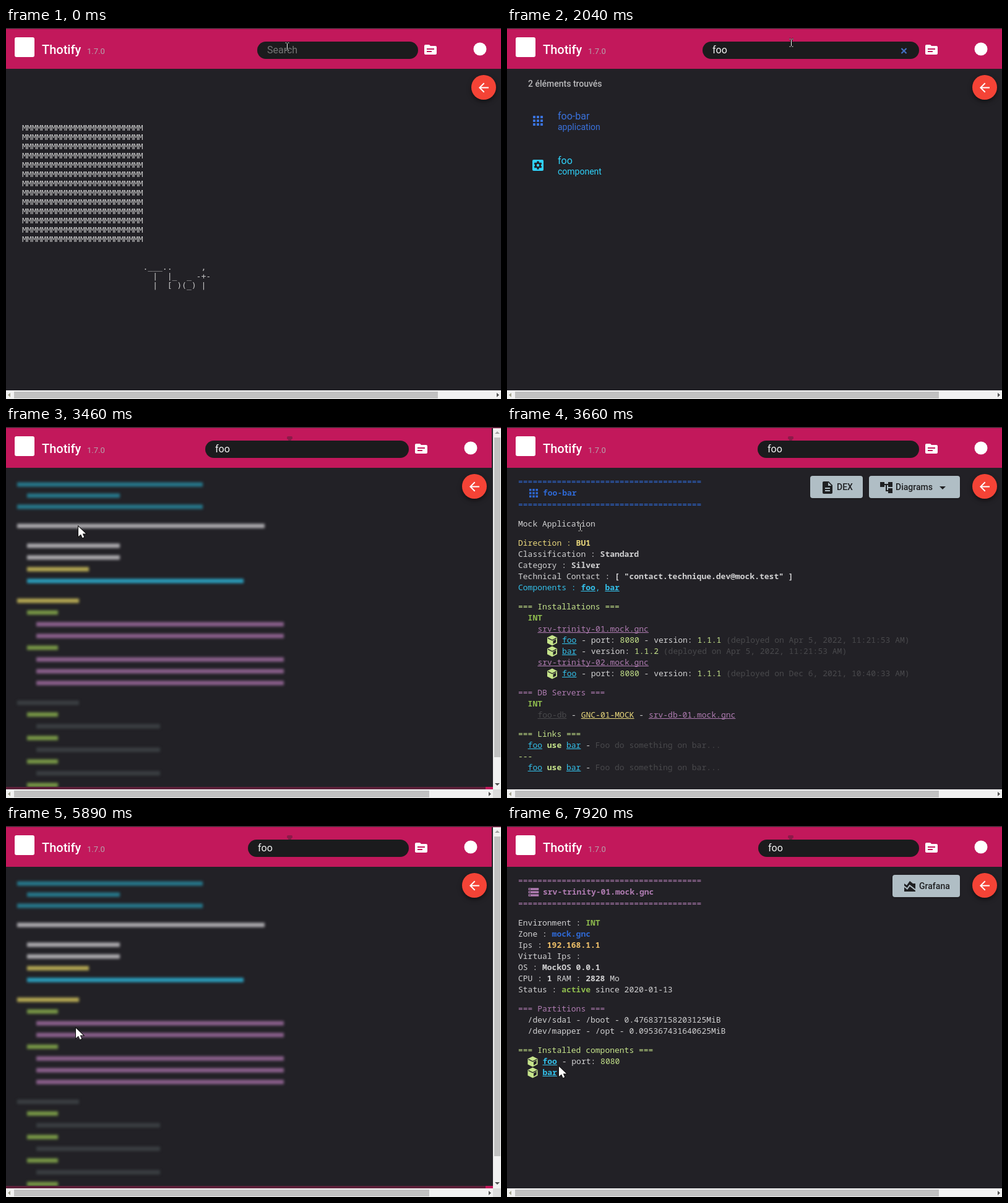
Recreate the animation shown at these times as an HTML page with a canvas. Size 800 by 600 pixels, loop 8 s.

```html
<!DOCTYPE html>
<html lang="fr">
<head>
<meta charset="utf-8">
<title>Thotify</title>
<style>
html, body { margin: 0; width: 800px; height: 600px; overflow: hidden; background: #222126; }
canvas { display: block; }
</style>
</head>
<body>
<canvas id="stage" width="800" height="600"></canvas>
<script>
const ctx = document.getElementById('stage').getContext('2d');
const LOOP = 8000, STEP = 203;
const BG = '#222126', PINK = '#c2185b';
const MONO = '"Noto Sans Mono", monospace', UI = 'Roboto, sans-serif';
const COLORS = {
  w: '#d2d2d3', b: '#2f69d4', y: '#ead87c', c: '#33c2ec', l: '#c6e48b',
  g: '#8fbc4e', p: '#b07cb2', d: '#49494c', o: '#efc069'
};
const ICONS = {
  folder: 'M20 6h-8l-2-2H4C2.9 4 2 4.9 2 6v12c0 1.1.9 2 2 2h16c1.1 0 2-.9 2-2V8c0-1.1-.9-2-2-2zM14 16H6v-2h8zM18 12H6v-2h12z',
  back: 'M20 11H7.8l5.6-5.6L12 4l-8 8 8 8 1.4-1.4L7.8 13H20z',
  doc: 'M14 2H6c-1.1 0-2 .9-2 2v16c0 1.1.9 2 2 2h12c1.1 0 2-.9 2-2V8zM16 18H8v-2h8zM16 14H8v-2h8zM13 9V3.5L18.5 9z',
  tree: 'M22 11V3h-7v3H9V3H2v8h7V8h2v10h4v3h7v-8h-7v3h-2V8h2v3z',
  chart: 'M3 13v7h18v-1.5l-9-7L8 17zM3 7l4 3 5-7 5 4h4v9l-9.4-7.3-4 5.4L3 10.4z',
  server: 'M2 20h20v-4H2zM4 17h2v2H4zM2 4v4h20V4zM6 7H4V5h2zM2 14h20v-4H2zM4 11h2v2H4z',
  apps: [4, 10, 16].map(x => [4, 10, 16].map(y => `M${x} ${y}h4v4h-4z`).join('')).join(''),
  arrow: 'M0 0V16L4 12.4 6.6 18.2 9.2 17 6.7 11.4H12z',
  hand: 'M-1 0Q1 -1 1.6 1V6Q3 5 4 6.4 5.6 5.4 6.6 7 8.6 6.4 9 8.4V12Q8.4 14 7.4 16H-1Q-3 12.6-5.4 9.6-5.2 7.4-3 8.8L-1.6 10V1Q-1.6.3-1 0Z'
};
for (const name in ICONS) ICONS[name] = new Path2D(ICONS[name]);

function rect(x, y, w, h, color, r = 0) {
  ctx.fillStyle = color;
  ctx.beginPath();
  ctx.roundRect(x, y, w, h, r);
  ctx.fill();
}
function disc(x, y, r, color) {
  ctx.fillStyle = color;
  ctx.beginPath();
  ctx.arc(x, y, r, 0, 7);
  ctx.fill();
}
function poly(points, color) {
  ctx.fillStyle = color;
  ctx.beginPath();
  points.forEach(p => ctx.lineTo(...p));
  ctx.fill();
}
function text(s, x, y, font, color) {
  ctx.font = font;
  ctx.fillStyle = color;
  ctx.fillText(s, x, y);
  return ctx.measureText(s).width;
}
function icon(name, x, y, color, size = 24) {
  ctx.save();
  ctx.translate(x, y);
  ctx.scale(size / 24, size / 24);
  ctx.fillStyle = color;
  ctx.fill(ICONS[name], 'evenodd');
  ctx.restore();
}

// "key:text" runs joined by "|"; a capital key is bold, a trailing "_" underlines.
function line(x, y, runs) {
  for (const run of runs.split('|')) {
    const cut = run.indexOf(':'), key = run.slice(0, cut), k = key[0];
    const color = COLORS[k.toLowerCase()];
    const weight = k < 'a' ? 'bold ' : '';
    const w = text(run.slice(cut + 1), x, y, weight + '13px ' + MONO, color);
    if (key[1]) rect(x, y + 1, w, 1, color);
    x += w;
  }
}
function cube(x, y) {
  const hex = [[0, -8.5], [8, -4.5], [8, 4.5], [0, 8.5], [-8, 4.5], [-8, -4.5]];
  const at = list => list.map(([a, b]) => [x + a, y + b]);
  poly(at(hex), COLORS.l);
  poly(at([[1.5, .8], [6.2, -1.8], [6.2, 3.3], [1.5, 6]]), BG);
  ctx.strokeStyle = BG;
  ctx.lineWidth = 1.2;
  ctx.beginPath();
  ctx.moveTo(x - 7, y - 3.6);
  ctx.lineTo(x, y - .2);
  ctx.lineTo(x + 7, y - 3.6);
  ctx.stroke();
}
function button(x, w, name, iconX, label, labelX) {
  ctx.save();
  ctx.shadowColor = 'rgba(0,0,0,.3)';
  ctx.shadowBlur = 3;
  ctx.shadowOffsetY = 1;
  rect(x, 79, w, 36, '#b0bec5', 4);
  ctx.restore();
  icon(name, iconX, 86, '#1f2022');
  text(label, labelX, 102, '500 14px ' + UI, '#1f2022');
}

function home() {
  const font = '13px "DejaVu Sans Mono", monospace';
  for (let row = 5; row < 18; row++) text('M'.repeat(25), 26, 91 + row * 15, font, '#c9c9c9');
  ['.___..      ,', '  |  |_  _ -+-', '  |  [ )(_) |']
    .forEach((s, i) => text(s, 221.5, 391 + i * 15, font, '#c9c9c9'));
}

function results(tick) {
  if (tick >= 13) rect(26, 114, 755, 72, '#2b2a2f', 3);
  text('2 éléments trouvés', 34, 95, '500 14px ' + UI, '#b9b9bb');
  const blue = '#3a72dc', cyan = '#2fd2fa';
  icon('apps', 38, 138, blue);
  text('foo-bar', 82, 148, '16px ' + UI, blue);
  text('application', 82, 165, '14px ' + UI, blue);
  rect(41, 213, 18, 18, cyan, 2);
  disc(50, 222, 5, BG);
  for (let i = 0; i < 6; i++) {
    ctx.save();
    ctx.translate(50, 222);
    ctx.rotate(i * Math.PI / 3);
    rect(-1.6, -6.6, 3.2, 3, BG);
    ctx.restore();
  }
  disc(50, 222, 2.2, cyan);
  text('foo', 82, 220, '16px ' + UI, cyan);
  text('component', 82, 237, '14px ' + UI, cyan);
}

function skeleton() {
  const bar = (y, x, w, color) => rect(x, y - 3.5, w, 7, color);
  const teal = '#26788b', grey = '#abaaae', yellow = '#b5a953', green = '#789846', plum = '#8c618d', dark = '#3a3f42';
  ctx.save();
  ctx.filter = 'blur(2px)';
  bar(93, 18, 300, teal);
  bar(111, 34, 150, teal);
  bar(129, 18, 300, teal);
  bar(160, 18, 400, grey);
  bar(192, 34, 150, grey);
  bar(211, 34, 150, grey);
  bar(230, 34, 100, yellow);
  bar(249, 34, 350, '#2a9dbb');
  bar(281, 18, 100, yellow);
  for (const y of [300, 357, 465, 503, 541, 579]) bar(y, 34, 50, green);
  for (const y of [319, 338, 376, 395, 414]) bar(y, 49, 400, plum);
  bar(446, 18, 100, dark);
  for (const y of [484, 522, 560]) bar(y, 49, 200, dark);
  ctx.restore();
  rect(0, 582, 775, 4, '#5c2039');
  rect(775, 582, 12, 4, PINK);
}

function heading(key, name, size, title) {
  const rule = key + ':' + '='.repeat(38), k = key.toUpperCase();
  line(18, 93, rule);
  icon(name, 43 - size / 2, 107 - size / 2, COLORS[key], size);
  line(58, 111, k + ':' + title);
  line(18, 130, rule);
}

function application() {
  heading('b', 'apps', 21, 'foo-bar');
  line(18, 161, 'w:Mock Application');
  line(18, 192, 'y:Direction : |Y:BU1');
  line(18, 210, 'w:Classification : |W:Standard');
  line(18, 228, 'w:Category : |W:Silver');
  line(18, 246, 'w:Technical Contact : |W:[ "contact.technique.dev@mock.test" ]');
  line(18, 264, 'c:Components : |C_:foo|c:, |C_:bar');
  line(18, 295, 'l:=== Installations ===');
  line(33.6, 313, 'G:INT');
  line(49.5, 331, 'p_:srv-trinity-01.mock.gnc');
  line(89, 349, 'c_:foo|w: - port: |l:8080|w: - version: |l:1.1.1|d: (deployed on Apr 5, 2022, 11:21:53 AM)');
  line(89, 367, 'c_:bar|w: - version: |l:1.1.2|d: (deployed on Apr 5, 2022, 11:21:53 AM)');
  line(49.5, 385, 'p_:srv-trinity-02.mock.gnc');
  line(89, 403, 'c_:foo|w: - port: |l:8080|w: - version: |l:1.1.1|d: (deployed on Dec 6, 2021, 10:40:33 AM)');
  for (const y of [345, 363, 399]) cube(73, y);
  line(18, 434, 'p:=== DB Servers ===');
  line(33.6, 452, 'G:INT');
  line(49.5, 470, 'd_:foo-db|w: - |y_:GNC-01-MOCK|w: - |p_:srv-db-01.mock.gnc');
  line(18, 501, 'l:=== Links ===');
  line(18, 537, 'l:---');
  for (const y of [519, 555]) line(33.6, y, 'c_:foo|L: use |c_:bar|w: - |d:Foo do something on bar...');
  button(490, 85, 'doc', 506, 'DEX', 533);
  button(585, 147, 'tree', 601, 'Diagrams', 628);
  poly([[699, 96], [709, 96], [704, 101]], '#1f2022');
}

function server() {
  heading('p', 'server', 20, 'srv-trinity-01.mock.gnc');
  line(18, 161, 'w:Environment : |G:INT');
  line(18, 179, 'w:Zone : |B:mock.gnc');
  line(18, 197, 'w:Ips : |O:192.168.1.1');
  line(18, 215, 'w:Virtual Ips :');
  line(18, 233, 'w:OS : |W:MockOS 0.0.1');
  line(18, 251, 'w:CPU : |W:1|w: RAM : |W:2828|w: Mo');
  line(18, 269, 'w:Status : |G:active|w: since 2020-01-13');
  line(18, 300, 'p:=== Partitions ===');
  line(33.6, 318, 'w:/dev/sda1 - /boot - 0.476837158203125MiB');
  line(33.6, 336, 'w:/dev/mapper - /opt - 0.095367431640625MiB');
  line(18, 367, 'l:=== Installed components ===');
  line(57.5, 385, 'C_:foo|w: - port: |l:8080');
  line(57.5, 403, 'C_:bar');
  cube(41.5, 381);
  cube(41.5, 399);
  button(623, 109, 'chart', 639, 'Grafana', 666);
}

function searchLeft(tick) {
  if (tick >= 4 && tick <= 16) return 316;
  return { 2: 380, 3: 325, 17: 337, 18: 405 }[tick] || 406;
}

function header(tick, shift) {
  rect(0, 0, 800, 1, '#2f3134');
  rect(0, 1, 800, 1, '#8a1c48');
  rect(0, 2, 800 - shift, 64, PINK);
  rect(14, 15, 32, 32, '#fff', 3);
  text('Thotify', 58, 42, '500 20px ' + UI, '#fff');
  text('1.7.0', 131, 42, '13px ' + UI, '#b5a5ac');

  const left = searchLeft(tick) - shift;
  rect(left, 22, 666 - shift - left, 28, '#1b1b1d', 14);
  const typed = 'foo'.slice(0, Math.max(0, tick - 4));
  const w = text(typed || 'Search', left + 16, 41, '16px ' + UI, typed ? '#f2f2f2' : '#757575');
  if (tick >= 4 && tick <= 6) rect(left + 16 + (typed ? w : 0), 27, 1, 17, '#fff');
  if (typed && tick <= 16) {
    ctx.strokeStyle = '#4470c2';
    ctx.lineWidth = 2.2;
    ctx.beginPath();
    for (const d of [-4, 4]) {
      ctx.moveTo(641.5 - d, 33);
      ctx.lineTo(641.5 + d, 41);
    }
    ctx.stroke();
  }
  if (tick >= 11) {
    rect(454, 15, 9, 5, '#8b1b49', 2);
    rect(456, 19, 5, 3, '#8b1b49', 1);
  }
  icon('folder', 674 - shift, 23, '#fff');
  disc(766 - shift, 34, 10.5, '#fff');

  ctx.save();
  ctx.shadowColor = 'rgba(0,0,0,.5)';
  ctx.shadowBlur = 7;
  ctx.shadowOffsetY = 3;
  disc(772 - shift, 96, 20, '#f44336');
  ctx.restore();
  icon('back', 760 - shift, 84.5, '#fff');
}

function scrollbars(tall) {
  const end = tall ? 787 : 800, track = '#f1f1f1', thumb = '#c1c1c1';
  rect(0, 586, 800, 14, track);
  rect(13, 588, (tall ? 684 : 698) - 13, 11, thumb);
  poly([[7, 590], [7, 597], [3, 593.5]], '#a3a38f');
  poly([[end - 7, 590], [end - 7, 597], [end - 3, 593.5]], '#505050');
  if (!tall) return;
  rect(787, 2, 13, 584, track);
  rect(787, 586, 13, 14, '#dcdcdc');
  rect(789, 17, 10, 517, thumb);
  poly([[790, 11], [798, 11], [794, 7]], '#a3a3a3');
  poly([[790, 576], [798, 576], [794, 580]], '#505050');
}

// Pointer stops: step, kind, x, y
const POINTER = [
  [0, 'beam', 454, 30], [1, 'beam', 457, 28], [3, 'beam', 459, 24],
  [11, 'beam', 430, 42], [12, 'arrow', 290, 95], [13, 'hand', 180, 135], [14, 'hand', 130, 155],
  [15, 'hand', 117, 161], [17, 'arrow', 117, 161], [18, 'beam', 118, 162],
  [22, 'beam', 118, 172], [23, 'beam', 117, 200], [24, 'beam', 113, 245], [25, 'arrow', 105, 285],
  [26, 'hand', 108, 322], [27, 'hand', 110, 329], [29, 'arrow', 113, 327],
  [30, 'beam', 156, 310], [31, 'beam', 174, 270], [32, 'arrow', 188, 240], [33, 'arrow', 188, 228],
  [34, 'arrow', 185, 245], [35, 'beam', 172, 295], [36, 'arrow', 148, 350], [37, 'arrow', 112, 400],
  [38, 'hand', 66, 400], [39, 'arrow', 84, 389]
];
function pointer(tick) {
  const [, kind, x, y] = POINTER.filter(p => p[0] <= tick).pop();
  ctx.save();
  ctx.translate(x, y);
  if (kind === 'beam') {
    const beam = new Path2D('M-3 -6H-1M1 -6H3M0 -5V5M-3 6H-1M1 6H3');
    ctx.translate(.5, 0);
    ctx.strokeStyle = '#111';
    ctx.lineWidth = 3;
    ctx.stroke(beam);
    ctx.strokeStyle = '#fff';
    ctx.lineWidth = 1;
    ctx.stroke(beam);
  } else {
    ctx.strokeStyle = '#111';
    ctx.lineWidth = 2;
    ctx.stroke(ICONS[kind]);
    ctx.fillStyle = '#fff';
    ctx.fill(ICONS[kind]);
  }
  ctx.restore();
}

function draw(now) {
  const tick = Math.min(39, Math.floor((now % LOOP + 15) / STEP));
  const loading = tick === 17 || tick === 29;
  rect(0, 0, 800, 600, BG);
  if (loading) skeleton();
  else if (tick < 10) home();
  else if (tick < 17) results(tick);
  else if (tick < 29) application();
  else server();
  header(tick, loading ? 15 : 0);
  scrollbars(loading);
  pointer(tick);
}

let start;
function loop(now) {
  start ??= now;
  draw(Math.max(0, now - start));
  requestAnimationFrame(loop);
}
draw(0);
requestAnimationFrame(loop);
</script>
</body>
</html>
```
